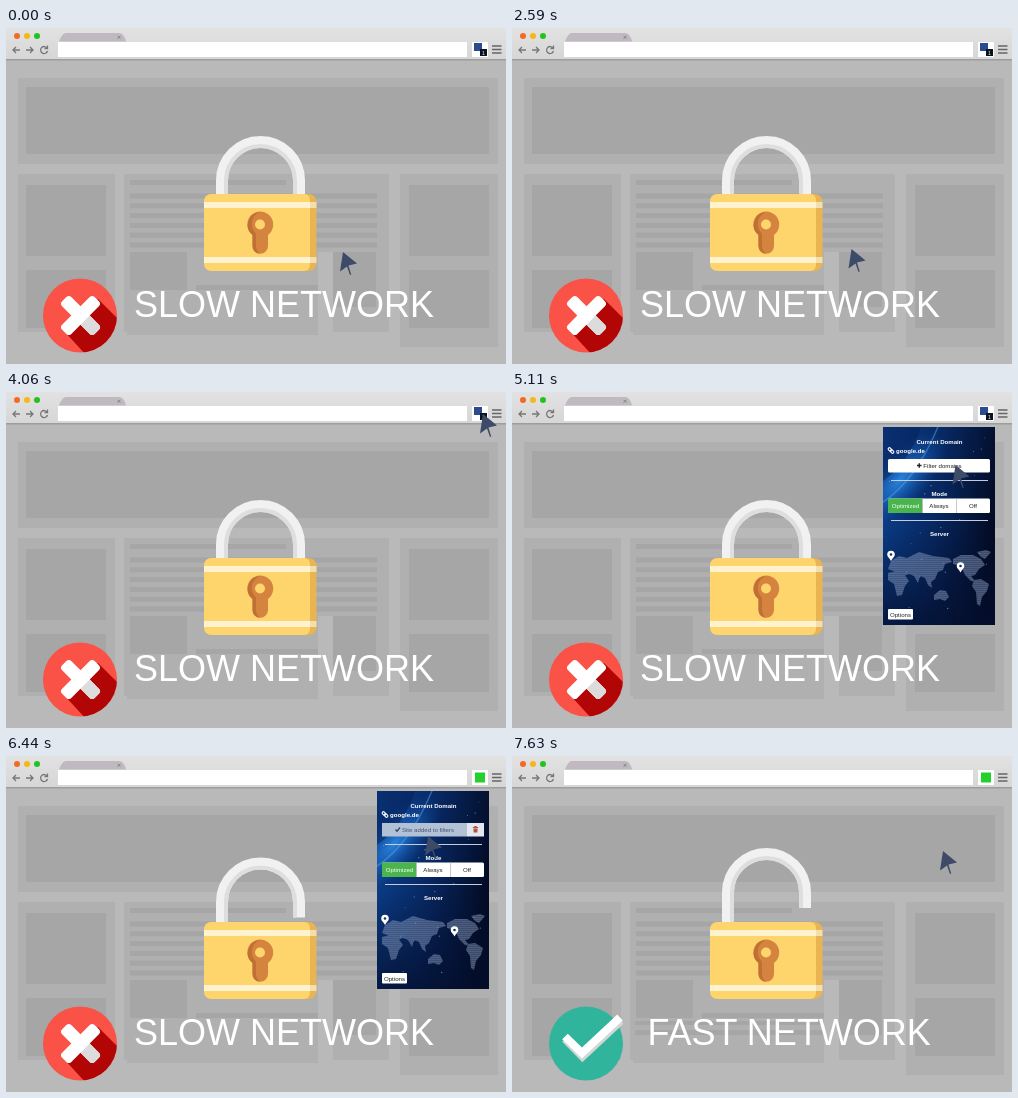
An HTML page that plays this animation: 500x336 px, repeating every 8 s.

```html
<!DOCTYPE html>
<html lang="en">
<head>
<meta charset="utf-8">
<title>Network lock</title>
<style>
html, body { margin: 0; width: 100%; height: 100%; overflow: hidden; background: #b9b9b9; }
svg { display: block; width: 500px; height: 336px; }
.big { font: 36px "Liberation Sans", Arial, sans-serif; fill: #fff; }
.ui { font: 6.1px "Liberation Sans", Arial, sans-serif; fill: #222; text-anchor: middle; }
.head { fill: #fff; font-weight: bold; }
</style>
</head>
<body>
<svg viewBox="0 0 500 336">
  <defs>
    <linearGradient id="bar" x2="0" y2="1"><stop stop-color="#e2e2e2"/><stop offset="1" stop-color="#d6d6d6"/></linearGradient>
    <linearGradient id="night" y1=".2" x2="1" y2=".45">
      <stop stop-color="#0b3f8c"/><stop offset=".5" stop-color="#072760"/><stop offset="1" stop-color="#030b24"/>
    </linearGradient>
    <linearGradient id="dusk" x2="0" y2="1">
      <stop offset=".5" stop-color="#040f2e" stop-opacity="0"/><stop offset="1" stop-color="#040f2e" stop-opacity=".75"/>
    </linearGradient>
    <radialGradient id="glow"><stop stop-color="#2f92ee" stop-opacity=".85"/><stop offset="1" stop-color="#1458b8" stop-opacity="0"/></radialGradient>
    <pattern id="dots" width="2" height="2" patternUnits="userSpaceOnUse"><circle cx="1" cy="1" r=".85" fill="#8396b8"/></pattern>
    <clipPath id="disc"><circle cx="74" cy="287.500" r="37"/></clipPath>
    <clipPath id="pane"><path d="M371 35h112v198H371z"/></clipPath>
    <path id="pin" d="M0 5.500C-1.500 2.500-3.800 1.500-3.800-1A3.800 3.800 0 0 1 3.800-1C3.800 1.500 1.500 2.500 0 5.500z" fill="#fff"/>
  </defs>

  <!-- page -->
  <path fill="#b9b9b9" d="M0 0h500v336H0z"/>
  <path fill="#b0b0b0" d="M12 50h480v86H12zM12 146h97v158H12zM118 146h265v158H327V224H312v83H121v-3h-3zM394 146h98v173h-98z"/>
  <g id="blocks" fill="#a6a6a6"></g>
  <path id="lines" fill="#a6a6a6" d="M123 265h189v4H123zM123 274h189v5H123z"/>

  <!-- browser bar -->
  <path fill="url(#bar)" d="M0 0h500v32H0z"/>
  <path fill="#9d9d9d" d="M0 31h500v1.500H0z"/>
  <path fill="#c0b9c1" d="M53 13.500q3-8.500 7-8.500h53q5 0 7 8.500z"/>
  <path stroke="#777" stroke-width=".8" d="M111.500 7.800l3 3m0-3l-3 3"/>
  <circle cx="11" cy="8" r="3" fill="#f46a22"/>
  <circle cx="21" cy="8" r="3" fill="#f5b814"/>
  <circle cx="31" cy="8" r="3" fill="#22c222"/>
  <path fill="#fff" d="M52 14h409v15H52zM466 14h16v15h-16z"/>
  <g fill="none" stroke="#777" stroke-width="1.300">
    <path d="M14 22H7m3-3l-3 3 3 3M20 22h7m-3-3l3 3-3 3M41 20a3.500 3.500 0 1 0 .5 3M41.500 17.500v3h-3"/>
    <path stroke-width="1.600" stroke="#666" d="M486 18h9.500M486 21.500h9.500M486 25h9.500"/>
  </g>
  <g id="idle">
    <path fill="#2c4a8e" d="M468 15h8v8h-8z"/>
    <path fill="#0b1220" d="M474 21h7v7h-7z"/>
    <text x="477.500" y="26.600" class="ui" style="fill:#fff;font-size:5px">1</text>
  </g>
  <path id="busy" fill="#24d12c" d="M469 16.500h10v10h-10z"/>

  <!-- padlock -->
  <g id="shackle" fill="none">
    <path stroke="#f1f1f1" stroke-width="12" d="M216 190V152.500a38.500 38.500 0 0 1 77 0V168"/>
    <path stroke="#dedede" stroke-width="4" d="M220 190V152.500a34.500 34.500 0 0 1 69 0V168"/>
  </g>
  <rect x="198" y="166" width="112.500" height="77" rx="8" fill="#e9b452"/>
  <path fill="#fed46d" d="M206 166h92q6 0 6 7v63q0 7-6 7h-92q-8 0-8-8v-61q0-8 8-8z"/>
  <path fill="#fff2cf" d="M198 174h106v6H198zM198 229h106v6H198z"/>
  <path fill="#f3deb0" d="M304 174h6.500v6H304zM304 229h6.500v6H304z"/>
  <path fill="#d5843f" d="M246.500 207a13 13 0 1 1 15.500 0v11a7.700 7.700 0 0 1-15.500 0z"/>
  <path fill="#c06f35" d="M254 184a13 13 0 0 0-7.500 23v11q0 7 7.500 7.700-4-3-4-8v-12a13 13 0 0 1 4-21.700z"/>
  <circle cx="254" cy="196.500" r="5" fill="#fed46d"/>

  <!-- status -->
  <g id="bad">
    <circle cx="74" cy="287.500" r="37" fill="#fa5246"/>
    <path clip-path="url(#disc)" fill="#b20505" d="M92 271l40 40-30 40-44-48z"/>
    <g transform="translate(74.500 287.500) rotate(45)" fill="#fff">
      <rect x="-23" y="-6.500" width="46" height="13" rx="3.500"/>
      <rect x="2" y="-6.500" width="21" height="13" rx="3.500" fill="#dcdcdc"/>
      <rect x="-6.500" y="-23" width="13" height="46" rx="3.500"/>
    </g>
  </g>
  <g id="good">
    <circle cx="74" cy="287.500" r="37" fill="#30b59c"/>
    <g id="tick" fill="none" stroke-dasharray="100">
      <path pathLength="100" stroke="#d2d6d6" stroke-width="9" d="M53.500 282.500l17 17.500 38-35.500"/>
      <path pathLength="100" stroke="#fff" stroke-width="8" d="M53 280.500l17 16.500 38-35.500"/>
    </g>
  </g>
  <text id="slow" class="big" x="128" y="289">SLOW NETWORK</text>
  <text id="fast" class="big" x="135.500" y="289">FAST NETWORK</text>

  <!-- extension panel -->
  <g id="panel" clip-path="url(#pane)">
    <path fill="url(#night)" d="M371 35h112v199H371z"/>
    <path fill="url(#dusk)" d="M371 35h112v199H371z"/>
    <ellipse cx="388" cy="88" rx="62" ry="26" fill="url(#glow)" transform="rotate(-46 388 88)"/>
    <path d="M368 112q36-22 60-82" stroke="#58aef5" stroke-width="1.500" opacity=".45" fill="none"/>
    <path d="M371 35h38q-12 36-38 54z" fill="#061c4e" opacity=".45"/>
    <g id="stars" fill="#7fb4ee"></g>
    <text class="ui head" x="427.500" y="52">Current Domain</text>
    <g fill="none" stroke="#fff" stroke-width="1.100" transform="rotate(45 379 58.500)">
      <rect x="375.500" y="57.200" width="4" height="2.600" rx="1.300"/>
      <rect x="378.500" y="57.200" width="4" height="2.600" rx="1.300"/>
    </g>
    <text class="ui head" x="398.500" y="61">google.de</text>
    <path fill="#c3cddd" d="M379 88h97v1h-97zM379 128h97v1h-97z"/>
    <g id="ask">
      <rect x="376" y="67" width="102" height="13.500" rx="1.500" fill="#fff"/>
      <path stroke="#222" stroke-width="1.400" d="M405 73.500h4.500m-2.250-2.250v4.500"/>
      <text class="ui" x="430.500" y="75.800">Filter domains</text>
    </g>
    <g id="done">
      <path fill="#b3c1d7" d="M376 67h85v13.500h-85z"/>
      <path fill="#e3e7ef" d="M461 67h17v13.500h-17z"/>
      <path fill="none" stroke="#33415c" stroke-width="1.200" d="M389.500 73.500l1.500 1.700 3-3.700"/>
      <text class="ui" x="422" y="75.800" style="fill:#46536b">Site added to filters</text>
      <path fill="#b8503f" d="M466.800 71h5.400v1h-5.400zM468.300 70h2.400v1h-2.400zM467.300 72.500h4.400l-.4 4h-3.600z"/>
    </g>
    <text class="ui head" x="427.500" y="104">Mode</text>
    <rect x="376" y="106.500" width="102" height="14.500" rx="1.500" fill="#fff"/>
    <path fill="#4ab54c" d="M376 106.500h34.500V121H376z"/>
    <path stroke="#bbb" stroke-width=".8" d="M410.500 106.500V121M444.500 106.500V121"/>
    <text class="ui" x="393.500" y="116" style="fill:#fff">Optimized</text>
    <text class="ui" x="427" y="116">Always</text>
    <text class="ui" x="461" y="116">Off</text>
    <text class="ui head" x="427.500" y="144">Server</text>
    <path fill="url(#dots)" d="M376 177l3-8 8-5 8 2 12-6 14 4 16 2 3 4-7 2-2 6-5 2-3 7-4 3 1 6-4-3-3-7-5-2-2 7-4-7-5-2-5 2-8-4z
      M376 181l8-2 8 3 5 7-4 5-3 9-5 1-3-12-6-4zM422 203l6-5 6 1 3 6-4 4-5-2-6 1z
      M441 167l8-4 12 0 8 4 4 6-6 4-4 6-4 1 5 6-5-1-6-6-4-9-8-2zM465 160l9-2 5 2-6 7-4-2z
      M462 188l7-1 8 5-2 7-5 6-2 9-3-2-1-12-4-6z"/>
    <use href="#pin" x="379" y="163.500"/><circle cx="379" cy="162.500" r="1.300" fill="#17305f"/>
    <use href="#pin" x="448.500" y="175"/><circle cx="448.500" cy="174" r="1.300" fill="#17305f"/>
    <rect x="376" y="217" width="25" height="10.500" rx="1" fill="#fff"/>
    <text class="ui" x="388.500" y="224.500">Options</text>
  </g>

  <path id="cursor" fill="#3d4a68" d="M3 0L0 19.500 7 14.500 10 23l1.200-.4L8.500 13.500 17 11.500z"/>
</svg>
<script>
const LOOP = 8000, STEP = 70;
const $ = id => document.getElementById(id);
const add = (parent, tag, attrs) => {
  const node = document.createElementNS("http://www.w3.org/2000/svg", tag);
  for (const key in attrs) node.setAttribute(key, attrs[key]);
  $(parent).append(node);
};
const block = (x, y, width, height) => add("blocks", "rect", { x, y, width, height });

block(20, 59, 463, 67);
for (const x of [20, 403]) {
  block(x, 157, 80, 71);
  block(x, 242, 80, 58);
}
block(124, 152, 156, 5);
for (let i = 0; i < 6; i++) block(124, 165.5 + i * 9.8, 247, 5);
block(124, 224, 57, 38);
block(190, 257, 122, 5);
block(327, 224, 43, 55);

let seed = 7;
const rand = () => (seed = seed * 16807 % 2147483647) / 2147483647;
for (let i = 0; i < 28; i++) {
  add("stars", "circle", { cx: 371 + rand() * 112, cy: 35 + rand() * 199, r: 0.3 + rand() * 0.5, opacity: 0.6 });
}

// time, left, top
const path = [
  [2520, 334, 224], [2590, 336.5, 221], [2660, 341, 214], [3360, 410, 113],
  [3990, 474, 22], [4200, 474, 22], [4830, 437.5, 86], [5040, 440.5, 73],
  [5180, 440.5, 73], [5390, 446, 74], [6160, 416, 74], [6440, 419, 80], [7140, 428, 95]
];
const lift = [[5740, 0], [6440, 6.5], [7140, 13], [7490, 16]];

function at(table, t) {
  const next = table.findIndex(row => row[0] > t);
  if (next === 0) return table[0].slice(1);
  if (next < 0) return table[table.length - 1].slice(1);
  const a = table[next - 1], b = table[next];
  const k = (t - a[0]) / (b[0] - a[0]);
  return a.slice(1).map((v, i) => v + (b[i + 1] - v) * k);
}
const ramp = (t, from, to) => Math.min(1, Math.max(0, (t - from) / (to - from)));
const show = (id, on) => $(id).setAttribute("opacity", +on);

function draw(now) {
  const t = Math.min(7630, Math.floor(now % LOOP / STEP) * STEP);
  const [x, y] = at(path, t);
  $("cursor").setAttribute("transform", `translate(${x} ${y})`);
  $("shackle").setAttribute("transform", `translate(0 ${-at(lift, t)[0]})`);
  const added = t >= 5180;
  show("idle", !added);
  show("busy", added);
  show("ask", !added);
  show("done", added);
  show("panel", t >= 4130 && t < 7210);
  show("slow", t < 7140);
  show("lines", t >= 7140);
  show("bad", t < 7280);
  show("good", t >= 7280);
  $("tick").setAttribute("stroke-dashoffset", 100 * (1 - ramp(t, 7210, 7490)));
  show("fast", ramp(t, 7280, 7630));
}
const start = performance.now();
(function tick() {
  draw(performance.now() - start);
  requestAnimationFrame(tick);
})();
</script>
</body>
</html>
```
